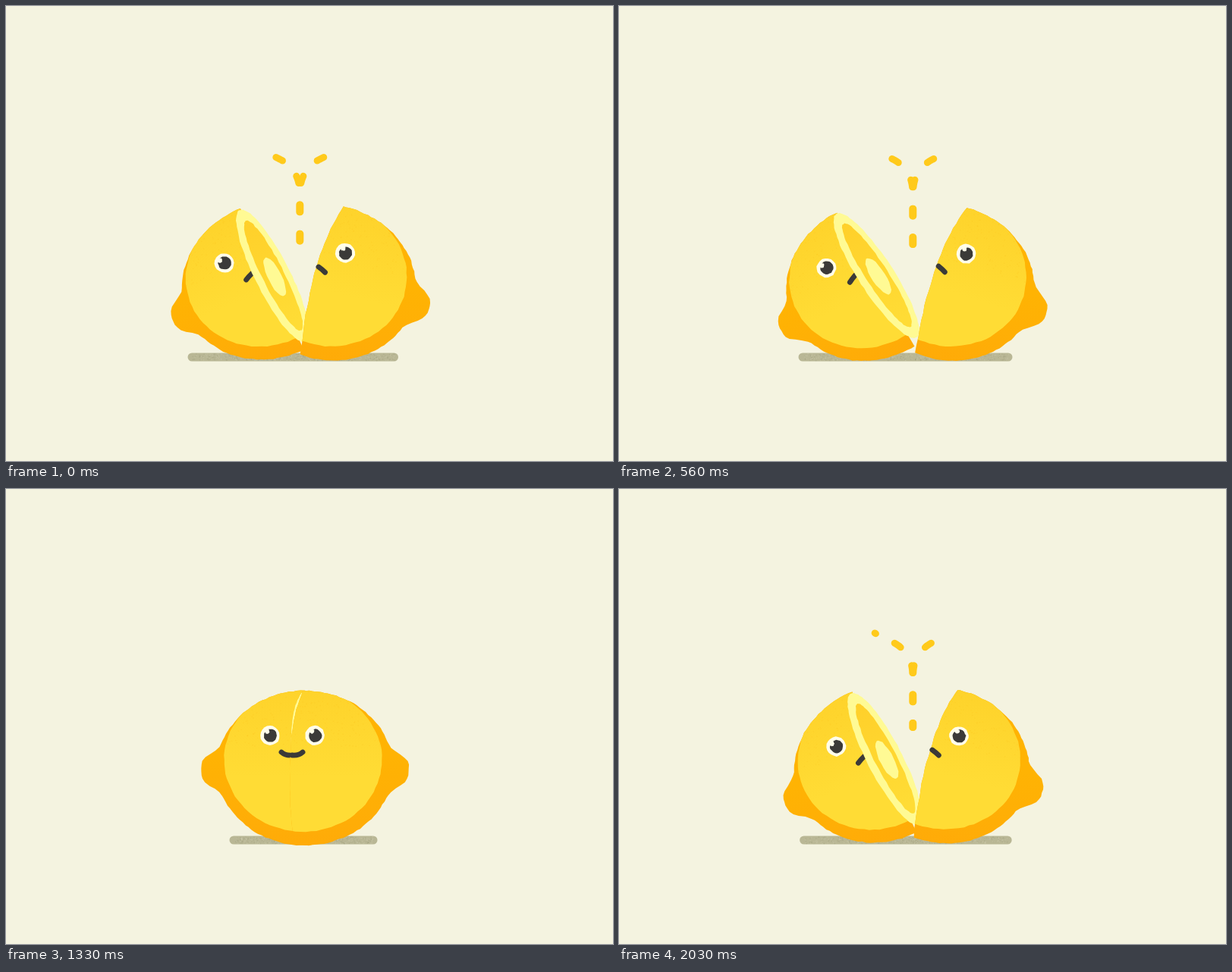
These frames come from a looping animation (800 by 600 pixels, 2100 ms). An HTML page with a canvas:

```html
<!DOCTYPE html>
<html lang="en">
<head>
<meta charset="utf-8">
<title>Lemon</title>
<style>
html, body { margin: 0; width: 100%; height: 100%; overflow: hidden; background: #f4f3e0; }
canvas { display: block; width: 800px; height: 600px; }
</style>
</head>
<body>
<canvas id="stage" width="800" height="600"></canvas>
<script>
const ctx = document.getElementById('stage').getContext('2d');
const STEP = 70, STEPS = 30;
const INK = '#3b3a38', CREAM = '#fffdea', PALE = '#fffa94';
const LEFT = { side: -1, tilt: -27, dx: -20, dy: -12, eye: 348 };
const RIGHT = { side: 1, tilt: 16.6, dx: 14, dy: -9, eye: 407 };

const lerp = (a, b, u) => a + (b - a) * u;
const clamp = u => Math.max(0, Math.min(1, u));
const rad = deg => deg * Math.PI / 180;

let seed = 1;
function rand() {
  seed = (seed * 1664525 + 1013904223) >>> 0;
  return seed / 4294967296;
}

// How far the halves lean apart: slow drift, smooth close, springy pop
function openness(f) {
  if (f < 8) return 0.79 + 0.21 * (f / 8) ** 1.5;
  if (f < 16) return 0.5 + 0.5 * Math.cos(Math.PI * (f - 8) / 8);
  const x = Math.max(0, f - 22.35);
  return 0.79 * (1 - Math.exp(-0.55 * x) * Math.cos(1.4 * x));
}

function outline(pts, rough = 0.6) {
  const path = new Path2D();
  for (const [x, y] of pts) path.lineTo(x + rough * (2 * rand() - 1), y + rough * (2 * rand() - 1));
  path.closePath();
  return path;
}

function shade(y0, c0, y1, c1) {
  const g = ctx.createLinearGradient(0, y0, 0, y1);
  g.addColorStop(0, c0);
  g.addColorStop(1, c1);
  return g;
}

function grain(x, y, w, h, count, color) {
  ctx.fillStyle = color;
  for (let i = 0; i < count; i++) ctx.fillRect(x + rand() * w, y + rand() * h, 1.3, 1.3);
}

function oval(x, y, a, b = a, deg = 0) {
  const n = Math.max(20, Math.round(a * 0.9)), c = Math.cos(rad(deg)), s = Math.sin(rad(deg)), pts = [];
  for (let i = 0; i < n; i++) {
    const t = i / n * 2 * Math.PI, u = a * Math.cos(t), v = b * Math.sin(t);
    pts.push([x + u * c - v * s, y + u * s + v * c]);
  }
  return outline(pts, 0.5);
}

function fill(path, color) {
  ctx.fillStyle = color;
  ctx.fill(path);
}

// Half an ellipse with a blunt nub; the right half has a bulging cut
function skin(side) {
  const pts = [], end = side < 0 ? Math.PI + 0.09 : Math.PI;
  for (let i = 0; i <= 70; i++) {
    const t = i / 70 * end, y = 368 - 102 * Math.cos(t);
    const nub = 21 * Math.exp(-(((y - 371) / 24) ** 4));
    pts.push([394 + side * (116 * Math.sin(t) + nub), y]);
  }
  for (let i = 0; side > 0 && i <= 24; i++) {
    const t = i / 24, m = 1 - t;
    pts.push([380 * m * m + 726 * m * t + 391 * t * t, 469 * m * m + 670 * m * t + 266 * t * t]);
  }
  return outline(pts);
}

function eye(x, y) {
  fill(oval(x, y, 12.8), CREAM);
  fill(oval(x + 0.5, y + 0.3, 8.6), INK);
  fill(oval(x - 4, y - 5.5, 3.2), CREAM);
}

function mouth(side, smile) {
  const x = 377, y = 351, dx = side * lerp(10, 14, smile), dy = lerp(5, -4, smile);
  ctx.strokeStyle = INK;
  ctx.lineWidth = 6.8;
  ctx.beginPath();
  ctx.moveTo(x, y);
  ctx.quadraticCurveTo(x + dx * 0.6, y + dy * 0.5 + smile * 3, x + dx, y + dy);
  ctx.stroke();
}

function cutFace(open) {
  const x = 399 + 3 * open, y = 364, tilt = 87 - 3 * open;
  fill(oval(x, y, 97, 23, tilt), PALE);
  fill(oval(x + 1, y, 81, 14.5, tilt), shade(285, '#ffd02a', 430, '#ffdc35'));
  fill(oval(x + 2, y + 2, 28, 9, tilt), PALE);
}

function half({ side, tilt, dx, dy, eye: eyeX }, open, smile) {
  ctx.save();
  ctx.translate(388 + dx * open, 455 + dy * open);
  ctx.rotate(rad(tilt * open));
  ctx.translate(-388, -455);

  const body = skin(side);
  fill(body, shade(350, '#ffb303', 468, '#ffab08'));
  ctx.save();
  ctx.clip(body);
  const glow = oval(391.5, 357, 104, 95);
  fill(glow, shade(266, '#fed32b', 380, '#ffdc35'));
  ctx.clip(glow);
  grain(280, 264, 230, 75, 260, 'rgba(250,185,20,.2)');
  ctx.restore();

  eye(eyeX, 325);
  mouth(side, smile);
  if (side < 0) cutFace(open);
  ctx.restore();
}

// Dashes climb a line that bends away to one side
function jet(side, length, f) {
  const gap = 38, shift = 4.5 + f * 7 * gap / STEPS, step = 0.75;
  const tail = f < 16 ? (f - 12) * 42 : 0;
  const head = f < 16 ? length : Math.min(length, (f - 22) * 118);
  let x = 387.3 + side * 0.5, y = 314.5;
  ctx.strokeStyle = '#ffca1b';
  ctx.lineWidth = 9;
  ctx.beginPath();
  for (let a = 0, on = false; a < head; a += step) {
    const lit = a >= tail && (a - shift + 20 * gap) % gap < 10.5;
    if (lit) {
      if (!on) ctx.moveTo(x, y);
      ctx.lineTo(x, y - 0.01);
    }
    on = lit;
    const turn = 1.1 * clamp((a - 71) / 50);
    x += side * step * Math.sin(turn);
    y -= step * Math.cos(turn);
  }
  ctx.stroke();
}

function shadow(spread) {
  const x0 = 300 - 58 * spread, x1 = 484 + 29 * spread;
  ctx.strokeStyle = '#b9b795';
  ctx.lineWidth = 11;
  ctx.beginPath();
  ctx.moveTo(x0, 463);
  ctx.lineTo(x1, 463);
  ctx.stroke();
  for (const color of ['rgba(150,148,115,.3)', 'rgba(215,213,185,.3)'])
    grain(x0, 458, x1 - x0, 9, 220, color);
}

function draw(f) {
  const open = openness(f), smile = f < 22 ? clamp(1.54 - 2 * open) : 0;
  seed = 977 + f * 7919;
  ctx.fillStyle = '#f4f3e0';
  ctx.fillRect(0, 0, 800, 600);
  ctx.lineCap = ctx.lineJoin = 'round';
  shadow(clamp(open * 1.2));
  jet(-1, 150, f);
  jet(1, 142, f);
  half(LEFT, open, smile);
  half(RIGHT, open, smile);
}

let shown = -1;
const start = performance.now();
function tick() {
  const f = Math.floor((performance.now() - start) / STEP) % STEPS;
  if (f !== shown) draw(shown = f);
  requestAnimationFrame(tick);
}
tick();
</script>
</body>
</html>
```
